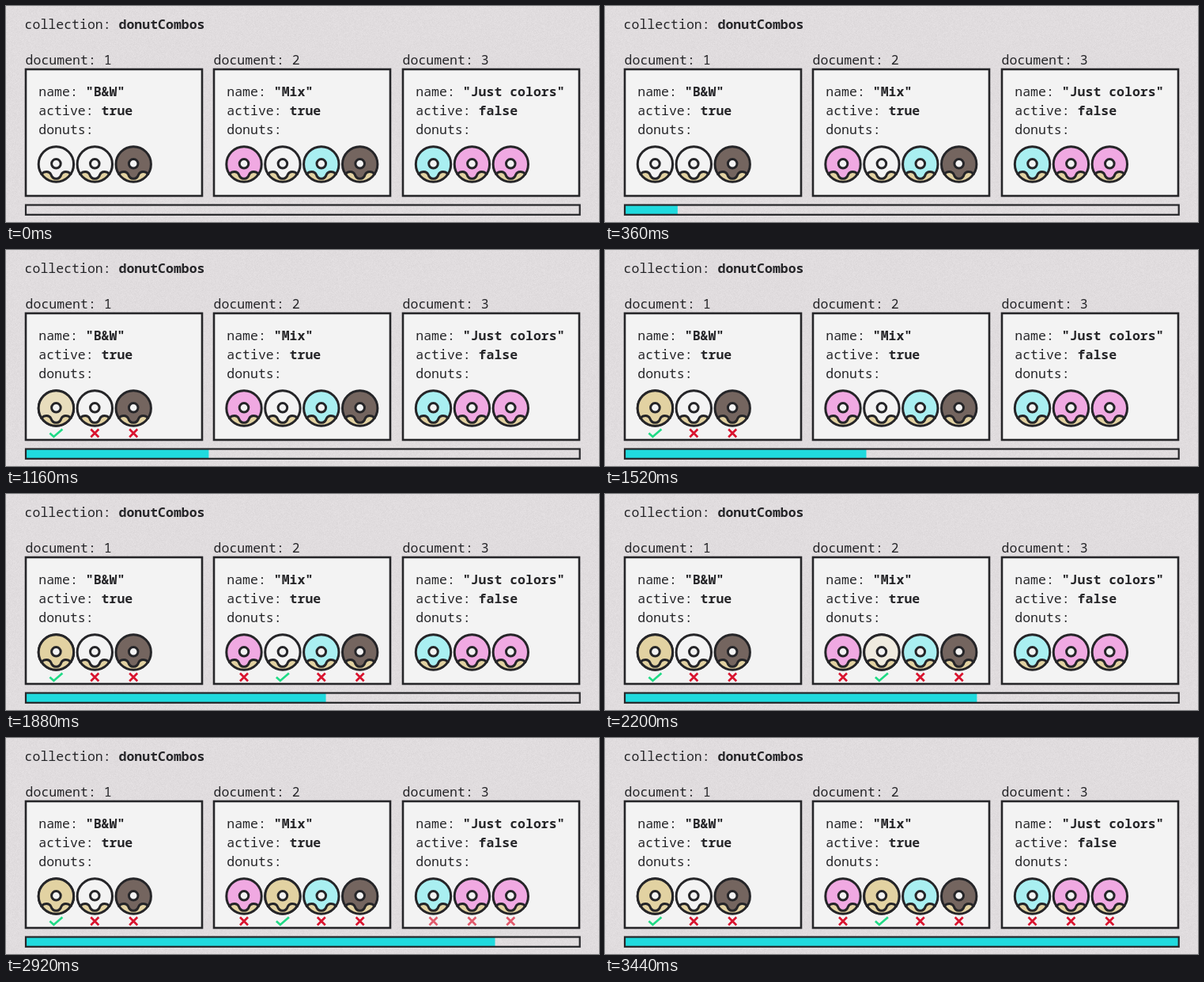
Write an HTML page with a canvas that moves like this. It is 750 px wide and 273 px high and loops after 5080 ms.

```html
<!DOCTYPE html>
<html lang="en">
<head>
<meta charset="utf-8">
<title>Donut combos</title>
<style>
html, body { margin: 0; width: 100%; height: 100%; overflow: hidden; background: #e0dcde; }
canvas { display: block; width: 750px; height: 273px; }
</style>
</head>
<body>
<canvas id="stage" width="750" height="273"></canvas>
<script>
const W = 750, H = 273, LOOP = 5080, STEP = 40, BAR_END = 3440;
const INK = '#252528', PAPER = [243, 243, 243], DOUGH = [226, 210, 162];
const WHITE = PAPER, PINK = [240, 169, 226], CYAN = [169, 239, 241], BROWN = [116, 101, 95];
const GAP = 48.9;
const ctx = document.getElementById('stage').getContext('2d');

const docs = [
  { x: 25, first: 63.4, name: '"B&W"', active: 'true', donuts: [WHITE, WHITE, BROWN], pick: 0, marks: 520, fill: 1000 },
  { x: 263, first: 301, name: '"Mix"', active: 'true', donuts: [PINK, WHITE, CYAN, BROWN], pick: 1, marks: 1660, fill: 2140 },
  { x: 502, first: 540.5, name: '"Just colors"', active: 'false', donuts: [CYAN, PINK, PINK], pick: -1, marks: 2800 }
];

const ramp = (t, start, length) => Math.min(1, Math.max(0, (t - start) / length));
const mix = (a, b, k) => a.map((v, i) => v + (b[i] - v) * k);
const rgb = c => `rgb(${c.join(',')})`;

function layer(draw) {
  const c = document.createElement('canvas');
  c.width = W;
  c.height = H;
  draw(c.getContext('2d'));
  return c;
}

function label(g, x, y, plain, bold = '') {
  const font = '16.53px "Noto Sans Mono", "DejaVu Sans Mono", monospace';
  g.fillStyle = INK;
  g.font = '500 ' + font;
  g.fillText(plain, x, y);
  const w = g.measureText(plain).width;
  g.font = 'bold ' + font;
  g.fillText(bold, x + w, y);
}

function grain(g) {
  let seed = 17;
  const rand = () => (seed = (seed * 16807) % 2147483647) / 2147483647;
  const img = g.createImageData(W, H);
  for (let i = 0; i < img.data.length; i += 4) {
    const n = (rand() + rand() - 1) * 6;
    img.data[i] = 224 + n;
    img.data[i + 1] = 220 + n;
    img.data[i + 2] = 222 + n;
    img.data[i + 3] = 255;
  }
  g.putImageData(img, 0, 0);
}

function disc(g, x, y, r, fill) {
  g.beginPath();
  g.arc(x, y, r, 0, Math.PI * 2);
  if (fill) {
    g.fillStyle = rgb(fill);
    g.fill();
  } else g.stroke();
}

// Lower edge of the icing: a dip on each side of one long drip.
function icingEdge(g) {
  g.beginPath();
  g.moveTo(-18.5, 12.5);
  g.bezierCurveTo(-15, 8.5, -8.5, 8.5, -6.5, 13);
  g.bezierCurveTo(-4.5, 20, 4.5, 20, 6.5, 13);
  g.bezierCurveTo(8.5, 8.5, 15, 8.5, 18.5, 12.5);
}

function donut(g, x, color) {
  g.save();
  g.translate(x, 200);
  g.strokeStyle = INK;
  g.lineWidth = 3;
  g.lineCap = g.lineJoin = 'round';
  disc(g, 0, 0, 22.2, color);
  icingEdge(g);
  g.arc(0, 0, 22.2, 0.6, Math.PI - 0.6);
  g.closePath();
  g.fillStyle = rgb(DOUGH);
  g.fill();
  icingEdge(g);
  g.stroke();
  disc(g, 0, 0, 22.2);
  disc(g, 0, -0.7, 5.8, PAPER);
  disc(g, 0, -0.7, 5.8);
  g.restore();
}

function mark(x, ok) {
  ctx.strokeStyle = ok ? '#20db86' : '#d9142f';
  ctx.lineWidth = 2.7;
  ctx.beginPath();
  if (ok) {
    ctx.moveTo(x - 8, 231.5);
    ctx.lineTo(x - 3, 236);
    ctx.lineTo(x + 8, 226.5);
  } else {
    ctx.moveTo(x - 5, 226.5);
    ctx.lineTo(x + 5, 236.5);
    ctx.moveTo(x + 5, 226.5);
    ctx.lineTo(x - 5, 236.5);
  }
  ctx.stroke();
}

const scene = layer(g => {
  grain(g);
  label(g, 23.6, 29, 'collection: ', 'donutCombos');
  docs.forEach((d, i) => {
    label(g, d.x - 0.4, 74, 'document: ' + (i + 1));
    g.fillStyle = rgb(PAPER);
    g.fillRect(d.x, 80, 223, 160);
    g.strokeStyle = INK;
    g.lineWidth = 2.6;
    g.strokeRect(d.x, 80, 223, 160);
    label(g, d.x + 16.3, 114, 'name: ', d.name);
    label(g, d.x + 16.3, 138, 'active: ', d.active);
    label(g, d.x + 16.3, 162, 'donuts:');
    d.donuts.forEach((c, k) => donut(g, d.first + GAP * k, c));
  });
});

function draw(now) {
  const t = Math.floor((now % LOOP) / STEP) * STEP;
  ctx.globalAlpha = 1;
  ctx.drawImage(scene, 0, 0);
  for (const d of docs) {
    const filled = ramp(t, d.fill, 240);
    ctx.globalAlpha = 1;
    if (filled > 0) donut(ctx, d.first + GAP * d.pick, mix(d.donuts[d.pick], DOUGH, filled));
    ctx.globalAlpha = ramp(t, d.marks, 175);
    d.donuts.forEach((c, k) => mark(d.first + GAP * k, k === d.pick));
  }
  ctx.globalAlpha = 1;
  ctx.fillStyle = '#20dade';
  ctx.fillRect(26, 252, 699.5 * ramp(t, 40, BAR_END - 40), 11.5);
  ctx.strokeStyle = INK;
  ctx.lineWidth = 2.2;
  ctx.strokeRect(25, 251.5, 700.7, 12.3);
}

const begin = performance.now();
function tick() {
  draw(performance.now() - begin);
  requestAnimationFrame(tick);
}
tick();
</script>
</body>
</html>
```
